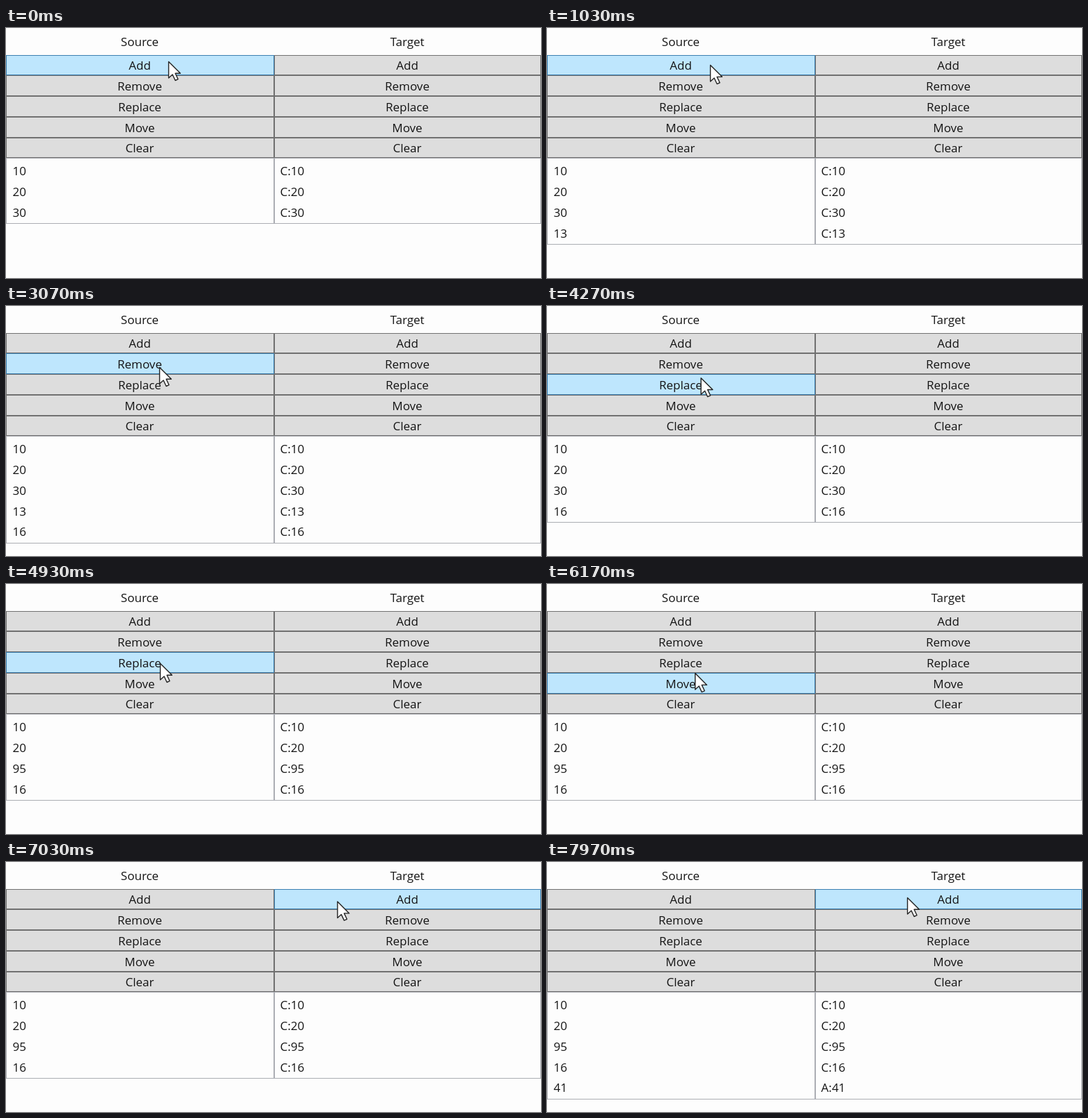
An HTML page that plays this animation: 768x360 px, repeating every 8 s.

```html
<!DOCTYPE html>
<html lang="en">
<head>
<meta charset="utf-8">
<title>List actions</title>
<style>
  html, body { margin: 0; width: 100%; height: 100%; overflow: hidden; background: #fdfdfd; }
  svg { display: block; width: 100%; height: 100%; }
  text { font: 17px "Open Sans", "Noto Sans", sans-serif; fill: #141414; }
  .label { text-anchor: middle; }
  .button { fill: #ddd; stroke: #707070; }
  .button.hover { fill: #bee6fd; stroke: #3c7fb1; }
  .button.pressed { fill: #c4e5f6; stroke: #2c628b; }
  .list { fill: none; stroke: #abadb3; }
  .cursor { fill: #fff; stroke: #222; stroke-width: 1.4; stroke-linejoin: round; }
</style>
</head>
<body>
<svg viewBox="0 0 768 360" id="stage"></svg>
<script>
const LOOP = 8000;
const PITCH = 29.75;
const BUTTON_TOP = 38.5;
const SPLIT = 385;
const HOLD = 110;
const ACTIONS = ["Add", "Remove", "Replace", "Move", "Clear"];

const MOVES = [
  { from: 30, to: 300, x: 234, y: 53 },
  { from: 1030, to: 1070, x: 235, y: 54 },
  { from: 1870, to: 2300, x: 236, y: 87 },
  { from: 2500, to: 2770, x: 228, y: 94 },
  { from: 3000, to: 3070, x: 220, y: 88 },
  { from: 4200, to: 4400, x: 221, y: 114 },
  { from: 5870, to: 6330, x: 211, y: 130 },
  { from: 6470, to: 6600, x: 190, y: 95 },
  { from: 6600, to: 7270, x: 517, y: 51 }
];

// Each click changes the list when the button is let go
const CLICKS = [
  { at: 30, change: list => list.push("C:13") },
  { at: 1370, change: list => list.push("C:16") },
  { at: 3400, change: list => list.splice(3, 1) },
  { at: 4800, change: list => list.splice(2, 1, "C:95") },
  { at: 7800, change: list => list.push("A:41") }
];

const stage = document.getElementById("stage");

function add(tag, attrs, content = "") {
  const node = document.createElementNS("http://www.w3.org/2000/svg", tag);
  for (const key in attrs) node.setAttribute(key, attrs[key]);
  node.textContent = content;
  return stage.appendChild(node);
}

const edge = row => Math.round(BUTTON_TOP + row * PITCH);
const easeOut = p => 1 - (1 - p) ** 2;

const columns = ["Source", "Target"].map((title, col) => {
  const x = col * SPLIT + 0.5;
  const width = (col ? 768 - SPLIT : SPLIT) - 1;
  const middle = 192 + col * 384;

  add("text", { class: "label", x: middle, y: 26.2 }, title);
  const frame = add("rect", { class: "list", x, y: edge(5) + 0.5, width });
  const buttons = ACTIONS.map((name, row) => {
    const y = edge(row) + 0.5;
    const height = edge(row + 1) - edge(row) - 1;
    const button = add("rect", { class: "button", x, y, width, height });
    add("text", { class: "label", x: middle, y: 60.4 + row * PITCH }, name);
    return button;
  });
  const items = ACTIONS.map((_, row) =>
    add("text", { x: 9.6 + col * 384, y: 212.4 + row * PITCH }));
  return { buttons, frame, items };
});

const cursor = add("path", {
  class: "cursor",
  d: "M.5.5V24L6 19l4 8.5 4-1.8-4-8.4h7.3Z"
});

function cursorAt(time) {
  let x = 233, y = 48;
  for (const move of MOVES) {
    const part = (time - move.from) / (move.to - move.from);
    const eased = easeOut(Math.min(1, Math.max(0, part)));
    x += (move.x - x) * eased;
    y += (move.y - y) * eased;
  }
  return { x, y };
}

function listAt(time) {
  const list = ["C:10", "C:20", "C:30"];
  for (const { at, change } of CLICKS) if (time >= at + HOLD) change(list);
  return list;
}

function render(time) {
  const { x, y } = cursorAt(time);
  cursor.setAttribute("transform", `translate(${x} ${y})`);

  const hoverCol = x < SPLIT ? 0 : 1;
  const pressed = CLICKS.some(({ at }) => time >= at && time < at + HOLD);
  const list = listAt(time);

  columns.forEach(({ buttons, frame, items }, col) => {
    buttons.forEach((button, row) => {
      const over = col === hoverCol && y >= edge(row) && y < edge(row + 1);
      const state = over ? (pressed ? " pressed" : " hover") : "";
      button.setAttribute("class", "button" + state);
    });
    frame.setAttribute("height", Math.round(list.length * PITCH + 5));
    items.forEach((item, row) => {
      const value = list[row] || "";
      item.textContent = col ? value : value.slice(2);
    });
  });
}

const start = performance.now();
function tick() {
  render((performance.now() - start) % LOOP);
  requestAnimationFrame(tick);
}
tick();
</script>
</body>
</html>
```
